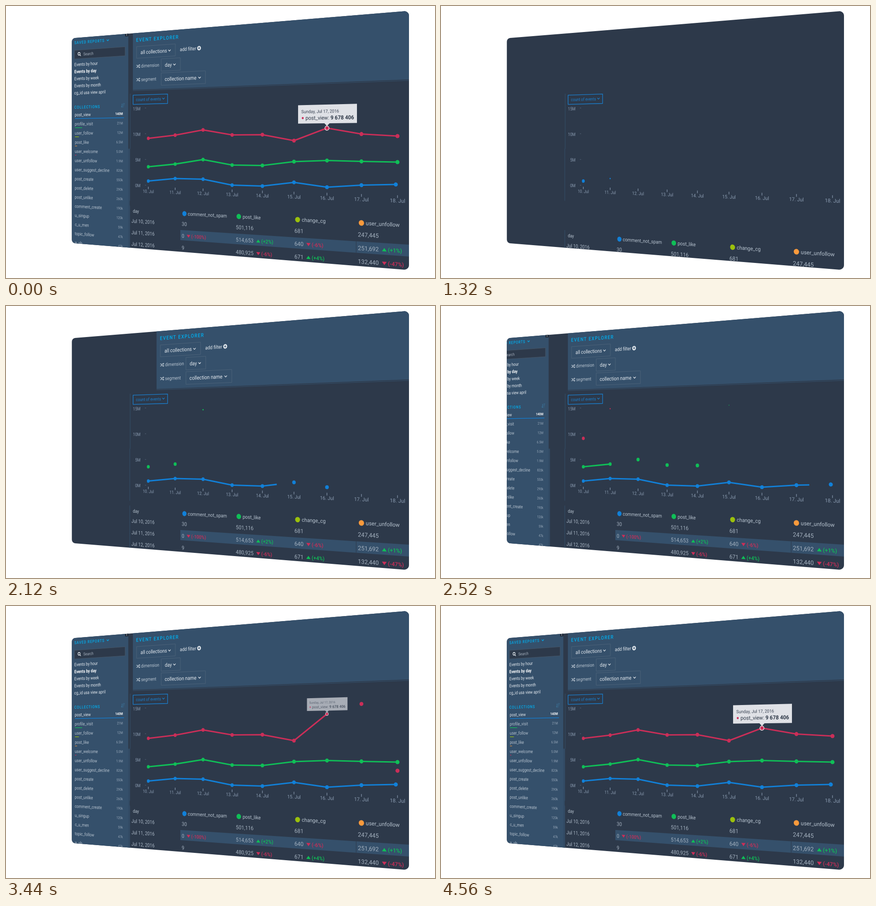
An HTML page with a canvas that plays this animation: 940x596 px, repeating every 8 s.

```html
<!DOCTYPE html>
<html lang="en">
<head>
<meta charset="utf-8">
<title>Event explorer</title>
<style>
  html, body { margin: 0; width: 100%; height: 100%; overflow: hidden; background: #fff; }
  canvas { display: block; }
</style>
</head>
<body>
<canvas id="stage" width="940" height="596"></canvas>
<script>
const ctx = document.getElementById('stage').getContext('2d');
const LOOP = 8000;
const DARK = '#2d394a', PANEL = '#35506b', BLUE = '#1180d8', GREEN = '#0fbf57', RED = '#cb2e58',
      LIME = '#9bc00c', ORANGE = '#fb9a3c', CYAN = '#00aeef', BRIGHT = '#e6ebf0', SOFT = '#b7c3cf', DIM = '#8a9bb0';

// The dashboard is a flat plane (u, v) seen in perspective; v = 0 is its middle line.
const SQUEEZE = 0.78, DEPTH = 0.000279, LEFT = 144, MIDDLE = 295;
const TOP = -225, BOTTOM = 225, RIGHT = 752;
let origin = { u: 0, v: 0 };
let fade = 1;

const clamp = x => Math.max(0, Math.min(1, x));
const ramp = (t, start, duration) => clamp((t - start) / duration);
const smooth = p => p * p * (3 - 2 * p);
const easeOut = p => 1 - (1 - p) * (1 - p);
const mix = (a, b, p) => a + (b - a) * p;

// Panels fade last, their labels first.
const panelAlpha = () => Math.min(1, fade * 4);
const labelAlpha = () => Math.pow(fade, 1.5);

// Sets the alpha for an accent colour; blue and green sink into the panel colour while fading.
function ink(color) {
  const sinks = fade < 0.7 && (color === BLUE || color === GREEN);
  ctx.globalAlpha = sinks ? panelAlpha() : fade;
  return sinks ? PANEL : color;
}

function project(u, v) {
  u += origin.u;
  v += origin.v;
  const scale = 1 / (1 - DEPTH * u);
  return { x: LEFT + SQUEEZE * u * scale, y: MIDDLE + v * scale, scale, v };
}

// Runs draw() in plane units around one point of the plane.
function local(u, v, draw) {
  const p = project(u, v), s = p.scale;
  ctx.setTransform(SQUEEZE * s * s, p.v * DEPTH * s * s, 0, s, p.x, p.y);
  draw();
  ctx.resetTransform();
}

function trace(points) {
  ctx.beginPath();
  for (const [u, v] of points) {
    const p = project(u, v);
    ctx.lineTo(p.x, p.y);
  }
}

function line(points, color, width) {
  trace(points);
  ctx.strokeStyle = color;
  ctx.lineWidth = width;
  ctx.stroke();
}

function traceBox(u0, v0, u1, v1) {
  trace([[u0, v0], [u1, v0], [u1, v1], [u0, v1]]);
  ctx.closePath();
}

function fillBox(u0, v0, u1, v1, color) {
  traceBox(u0, v0, u1, v1);
  ctx.fillStyle = color;
  ctx.fill();
}

function strokeBox(u0, v0, u1, v1, color, width = 1) {
  traceBox(u0, v0, u1, v1);
  ctx.strokeStyle = color;
  ctx.lineWidth = width;
  ctx.stroke();
}

function text(str, u, v, size, color, { weight = 400, align = 0, spacing = 0 } = {}) {
  ctx.font = `${weight} ${size}px Roboto, sans-serif`;
  ctx.letterSpacing = spacing + 'px';
  const width = ctx.measureText(str).width;
  local(u + width * (0.5 - align), v, () => {
    ctx.fillStyle = color;
    ctx.fillText(str, -width / 2, size * 0.35);
  });
  return width;
}

function dot(u, v, radius, color, ring) {
  local(u, v, () => {
    ctx.beginPath();
    ctx.arc(0, 0, radius, 0, 2 * Math.PI);
    ctx.fillStyle = color;
    ctx.fill();
    if (!ring) return;
    ctx.strokeStyle = ring;
    ctx.lineWidth = 1.1;
    ctx.stroke();
  });
}

function triangle(u, v, up, color) {
  const d = up ? 1 : -1;
  trace([[u - 4.3, v + 2.8 * d], [u + 4.3, v + 2.8 * d], [u, v - 3 * d]]);
  ctx.fillStyle = color;
  ctx.fill();
}

const chevron = (u, v, color) => line([[u - 2.8, v - 1.5], [u, v + 1.3], [u + 2.8, v - 1.5]], color, 1.2);

function shuffleIcon(u, v) {
  for (const d of [1, -1]) {
    line([[u - 4.5, v - 2.2 * d], [u - 2.3, v - 2.2 * d], [u + 1.3, v + 2.2 * d], [u + 4, v + 2.2 * d]], SOFT, 1.2);
    line([[u + 2.8, v + 2.2 * d - 1.6], [u + 4.7, v + 2.2 * d], [u + 2.8, v + 2.2 * d + 1.6]], SOFT, 1.1);
  }
}

// --- sidebar -------------------------------------------------------------
const reports = ['Events by hour', 'Events by day', 'Events by week', 'Events by month', 'cg_id usa view april'];
const collections = [
  ['post_view', '140M', BLUE, 132], ['profile_visit', '21M', GREEN, 20], ['user_follow', '12M', LIME, 11],
  ['post_like', '6.5M', ORANGE, 6], ['user_welcome', '5.0M', RED, 4], ['user_unfollow', '1.9M'],
  ['user_suggest_decline', '820k'], ['post_create', '550k'], ['post_delete', '290k'], ['post_unlike', '260k'],
  ['comment_create', '190k'], ['u_singup', '120k'], ['c_u_men', '59k'], ['topic_follow', '47k'], ['p_sh', '42k']
];

function sidebar(t) {
  const hidden = 1 - smooth(ramp(t, 2250, 400));
  if (hidden === 1) return;
  origin = { u: -156 * hidden, v: 0 };
  ctx.globalAlpha = fade;
  fillBox(152, 17, 155.8, BOTTOM, '#324b65');
  ctx.globalAlpha = panelAlpha();
  fillBox(0, TOP, 152.2, BOTTOM, PANEL);
  fillBox(7.7, -197.4, 144, -178.5, DARK);
  strokeBox(7.7, -197.4, 144, -178.5, '#4a586a', 0.8);
  fillBox(144, TOP, 152.3, -219, '#1c2634');
  ctx.globalAlpha = labelAlpha();
  text('›', 148, -223, 9, BRIGHT, { weight: 700, align: 0.5 });
  text('SAVED REPORTS', 7.7, -214, 9, CYAN, { weight: 500, spacing: 1.05 });
  chevron(98.5, -214, CYAN);
  local(21, -188.5, () => {
    ctx.beginPath();
    ctx.arc(-0.5, -0.7, 2.9, 0, 2 * Math.PI);
    ctx.moveTo(1.7, 1.5);
    ctx.lineTo(4.2, 4.2);
    ctx.strokeStyle = BRIGHT;
    ctx.lineWidth = 1.5;
    ctx.stroke();
  });
  text('Search', 32.5, -188, 9, '#a3aebb');
  reports.forEach((name, i) =>
    text(name, 7.7, -166.2 + 15.45 * i, 9.9, i === 1 ? '#fff' : BRIGHT, { weight: i === 1 ? 600 : 400 }));

  text('COLLECTIONS', 7.7, -73, 9, CYAN, { weight: 500, spacing: 1.1 });
  line([[136, -78], [136, -70], [134, -72.5]], '#3d7ea8', 0.9);
  for (let i = 0; i < 4; i++) line([[138.5, -78 + 2.5 * i], [143 - i, -78 + 2.5 * i]], '#3d7ea8', 0.8);
  collections.forEach(([name, count, color, length], i) => {
    const v = -56.5 + 19.97 * i;
    text(name, 8.9, v, 9.9, i ? SOFT : BRIGHT);
    text(count, 138.1, v - 0.3, 7.6, i ? '#98a8b9' : '#fff', { weight: i ? 400 : 700, align: 1 });
    if (color) line([[9, v + 8.3], [9 + length, v + 8.3]], color, 1.2);
  });
}

// --- header --------------------------------------------------------------
function dropdown(label, u0, v0, u1, v1, textU, chevronU) {
  const v = (v0 + v1) / 2 + 0.3;
  strokeBox(u0, v0, u1, v1, '#52677d', 0.8);
  text(label, textU, v, 10.7, BRIGHT);
  chevron(chevronU, v, BRIGHT);
}

function header(t) {
  const hidden = 1 - smooth(ramp(t, 1800, 400));
  if (hidden === 1) return;
  origin = { u: 586 * hidden, v: 0 };
  ctx.globalAlpha = panelAlpha();
  fillBox(163.9, TOP - 3, RIGHT, -106, PANEL);
  line([[163.9, -104.3], [RIGHT, -104.3]], PANEL, 1);
  ctx.globalAlpha = labelAlpha();
  text('EVENT EXPLORER', 173, -209.8, 10.5, CYAN, { weight: 500, spacing: 1.4 });
  dropdown('all collections', 173.3, -196, 269.2, -171.7, 183.7, 255);
  text('add filter', 280.1, -184.2, 9.9, BRIGHT);
  dot(325.3, -184.3, 4.4, BRIGHT);
  line([[322.8, -184.3], [327.8, -184.3]], PANEL, 1.3);
  line([[325.3, -186.8], [325.3, -181.8]], PANEL, 1.3);
  shuffleIcon(177.3, -155);
  text('dimension', 184.8, -155.3, 9.8, SOFT);
  dropdown('day', 234.9, -167.3, 281.2, -142.2, 243.8, 267);
  shuffleIcon(177.3, -127);
  text('segment', 184.8, -127, 9.8, SOFT);
  dropdown('collection name', 234.9, -138.5, 340, -113.3, 243.8, 326.4);
}

// --- table ---------------------------------------------------------------
const columns = [
  ['comment_not_spam', BLUE, ['30'], ['0', '-100%'], ['9']],
  ['post_like', GREEN, ['501,116'], ['514,653', '+2%'], ['480,925', '-6%']],
  ['change_cg', LIME, ['681'], ['640', '-6%'], ['671', '+4%']],
  ['user_unfollow', ORANGE, ['247,445'], ['251,692', '+1%'], ['132,440', '-47%']]
];
const rowV = [168, 192, 216];

function table(t) {
  const hidden = 1 - smooth(ramp(t, 1140, 400));
  if (hidden === 1) return;
  origin = { u: 0, v: 90 * hidden };
  ctx.globalAlpha = panelAlpha();
  fillBox(281.2, 180.3, RIGHT, 200.8, PANEL);
  line([[653.4, 180.3], [653.4, 200.8]], DARK, 1);
  line([[156, 136], [156, BOTTOM]], PANEL, 1);

  const label = (...args) => {
    ctx.globalAlpha = Math.sqrt(fade);
    return text(...args);
  };
  label('day', 163.9, 147, 9.9, SOFT);
  rowV.forEach((v, i) => label(`Jul ${10 + i}, 2016`, 160.4, v, 10.8, '#aab7c5'));
  columns.forEach(([name, color, ...cells], c) => {
    const u = 284.5 + 124.1 * c;
    label(name, u + 14.9, 147, 9.9, SOFT);
    dot(u + 6.4, 147, 5, ink(color));
    cells.forEach(([number, change], r) => {
      const width = label(number, u, rowV[r], 10.8, '#a3b0be');
      if (!change) return;
      const up = change[0] === '+', tint = ink(up ? GREEN : RED);
      triangle(u + width + 10, rowV[r], up, tint);
      text(`(${change})`, u + width + 16.5, rowV[r], 9.9, tint, { weight: 500 });
    });
  });
}

// --- chart ---------------------------------------------------------------
const dayU = i => 203 + 65.75 * i;
const SKY = -67;
const series = [
  { color: BLUE, values: [83.5, 76.8, 76.6, 86.6, 86.6, 77.9, 85, 79.5, 76.6],
    dots: [1140, 140, 100], draw: t => (t - 1510) / 137 },
  { color: GREEN, values: [54, 47.5, 37.6, 47.5, 47.4, 39.2, 36.3, 37.1, 37.5],
    dots: [1790, 141, 130], falls: true, draw: t => (t - 2390) / 130 },
  { color: RED, values: [-4.7, -11.1, -21.3, -11.1, -11.3, 0, -22.9, -11.8, -8],
    dots: [2335, 141, 130], falls: true,
    draw: t => Math.min(6, (t - 2740) / 116) + 2 * ramp(t, 3920, 640),
    // the last three days travel slowly: start, duration, first height, easing
    slow: { 6: [3220, 500, SKY, smooth], 7: [3100, 1230, -78, smooth], 8: [3208, 1032, 93, easeOut] } }
];

function pose(s, i, t) {
  const [start, step, duration] = s.dots, end = s.values[i];
  const u = dayU(i) - (s.color === BLUE && i === 8 ? 3 : 0);
  if (s.slow && s.slow[i]) {
    const [begin, time, from, ease] = s.slow[i];
    const p = ramp(t, begin, time);
    return { u, v: mix(from, end, ease(p)), size: i === 6 ? easeOut(p) : ramp(t, begin, 130) };
  }
  const p = ramp(t, start + step * i, duration);
  return { u, v: s.falls ? mix(SKY, end, p ** 3) : end, size: p };
}

function plot(s, t) {
  const points = s.values.map((_, i) => pose(s, i, t));
  const progress = Math.max(0, Math.min(8, s.draw(t)));
  const color = ink(s.color);
  if (progress > 0) {
    const whole = Math.floor(progress), part = progress - whole;
    const path = points.slice(0, whole + 1).map(p => [p.u, p.v]);
    if (part) {
      const a = points[whole], b = points[whole + 1];
      path.push([mix(a.u, b.u, part), mix(a.v, b.v, part)]);
    }
    line(path, color, 3.1);
  }
  points.forEach(p => {
    if (p.size > 0) dot(p.u, p.v, 3.6 * p.size, color);
  });
  return points;
}

function axes() {
  ctx.globalAlpha = 1;
  line([[157, -98.5], [157, 17], [156, 17], [156, 126]], PANEL, 1);
  strokeBox(164.5, -95, 250.5, -75.8, '#1a7fce', 1.3);
  text('count of events', 172.1, -85.5, 9.1, '#1a7fce');
  chevron(240.4, -86, '#1a7fce');
  for (let i = 0; i < 4; i++) {
    const v = 93.5 - 53.3 * i;
    text(5 * i + 'M', 183.5, v, 9.6, DIM, { align: 1 });
    line([[194.5, v - 1.2], [197.5, v - 1.2]], '#566579', 1);
  }
  for (let i = 0; i < 9; i++) {
    line([[dayU(i), 95.3], [dayU(i), 100.2]], DIM, 1.2);
    text(`${10 + i}. Jul`, dayU(i), 104.9, 9.2, DIM, { align: 0.5 });
  }
}

function tooltip({ u, v, size }) {
  if (!size) return;
  const at = (du, dv) => [u + du * size, v + dv * size];
  ctx.globalAlpha = size * labelAlpha();
  trace([[-57.4, -43], [57.4, -43], [57.4, -8.8], [5, -8.8], [0, -4], [-5, -8.8], [-57.4, -8.8]].map(p => at(...p)));
  ctx.fillStyle = '#dfe1e6';
  ctx.fill();
  dot(u, v, 4 * size, RED, '#f0f1f4');
  ctx.globalAlpha = size * fade;
  text('Sunday, Jul 17, 2016', ...at(-50.5, -30.8), 8.2 * size, '#3a4454');
  dot(...at(-48, -19), 2 * size, RED);
  const width = text('post_view: ', ...at(-42.3, -19), 10 * size, '#2f3948');
  text('9 678 406', u - 42.3 * size + width, v - 19 * size, 10 * size, '#2f3948', { weight: 700 });
}

function clipToPanel() {
  ctx.beginPath();
  ctx.moveTo(500, 42);
  ctx.arcTo(883, 10.5, 883, 578.5, 10);
  ctx.arcTo(883, 578.5, 144.3, 519.5, 10);
  ctx.arcTo(144.3, 519.5, 144.3, 70.5, 8);
  ctx.arcTo(144.3, 70.5, 883, 10.5, 8);
  ctx.closePath();
  ctx.clip();
}

function render(time) {
  const clock = time % LOOP;
  const leaving = clock < 1080;
  const t = leaving ? LOOP : clock;
  fade = leaving ? 1 - ramp(clock, 560, 400) : 1;

  ctx.clearRect(0, 0, 940, 596);
  ctx.save();
  clipToPanel();
  ctx.fillStyle = DARK;
  ctx.fillRect(0, 0, 940, 596);
  ctx.lineJoin = 'round';

  origin = { u: 0, v: 0 };
  axes();
  table(t);
  header(t);
  origin = { u: 0, v: 0 };
  const [, , red] = series.map(s => plot(s, t));
  tooltip(red[6]);
  sidebar(t);
  ctx.restore();
}

const started = performance.now();
function tick() {
  render(performance.now() - started);
  requestAnimationFrame(tick);
}
tick();
</script>
</body>
</html>
```
